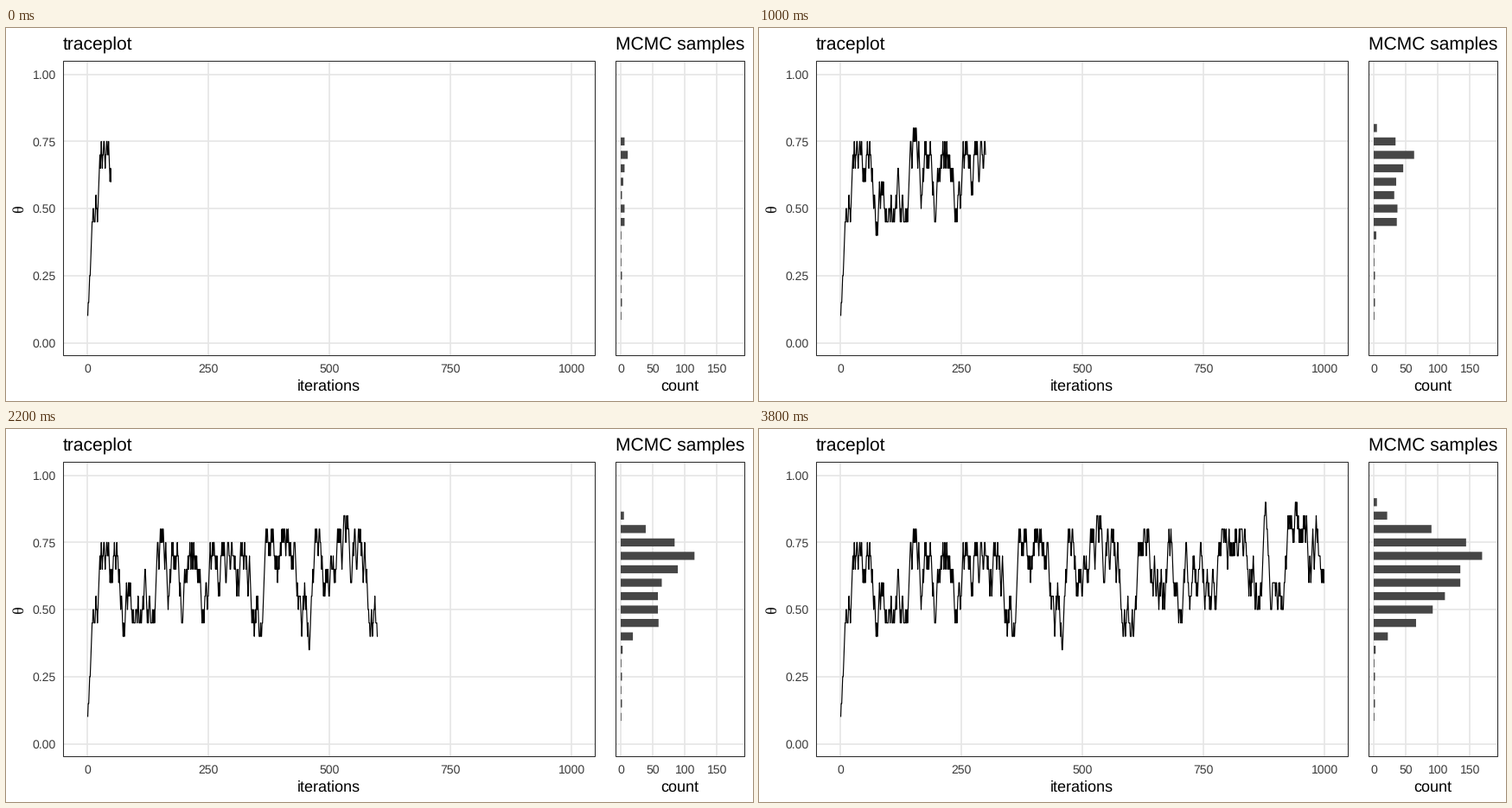
Recreate the animation shown at these times as a matplotlib script. Size 864 by 432 pixels, loop 4 s.

```python
import math
import random

import matplotlib.pyplot as plt
import numpy as np
from matplotlib.animation import FuncAnimation
from matplotlib.patches import Rectangle

plt.rcParams.update({"path.simplify": False, "text.hinting": "none",
                     "text.hinting_factor": 1})

W, H, DPI = 864, 432, 100
PX = 72 / DPI
N, CHUNK = 1000, 50
INK, GRID, BAR, TICK = "#2c2c2c", "#e6e6e6", "#464646", "#3a3a3a"
TOP, BOTTOM = 38.5, 379.5

# Main peaks and dips (iteration, level); one level is 0.05 in theta.
TURNS = [(1, 2), (13, 10), (21, 9), (34, 15), (61, 15), (77, 8), (97, 9),
         (119, 13), (139, 9), (157, 16), (167, 10), (175, 15), (195, 9),
         (220, 15), (239, 9), (281, 15), (292, 15), (309, 11), (325, 15),
         (342, 9), (357, 8), (381, 16), (418, 15), (436, 10), (459, 7),
         (479, 16), (491, 11), (531, 17), (545, 12), (561, 16), (600, 8),
         (629, 16), (666, 10), (683, 16), (706, 9), (745, 15), (766, 10),
         (783, 15), (826, 16), (862, 10), (879, 18), (890, 10), (915, 10),
         (940, 18), (963, 17), (1000, 12)]
CENTRE = 12


def iter_x(i):
    return 94 + 0.56 * i


def count_x(c):
    return 711 + 0.742 * c


def theta_y(t):
    return 364.5 - 310.8 * t


def bridge(a, b, n, rng):
    """Random steps of at most one level that lead from a to b in n moves."""
    lo, hi = min(a, b, CENTRE), max(a, b, CENTRE)
    level, path = a, []
    for left in range(n, 0, -1):
        gap = b - level
        moves = [m for m in (-1, 0, 1)
                 if abs(gap - m) < left and lo <= level + m <= hi]
        pull = 1.5 * gap / left + 0.06 * (CENTRE + 1 - level)
        weights = [math.exp(m * pull) if m else 0.5 for m in moves]
        level += rng.choices(moves, weights)[0]
        path.append(level)
    return path


def make_walk():
    rng = random.Random(4)
    walk = [TURNS[0][1]]
    for (i, a), (j, b) in zip(TURNS, TURNS[1:]):
        walk += bridge(a, b, j - i, rng)
    return np.array(walk)


walk = make_walk()
xs = iter_x(np.arange(1, N + 1))
ys = theta_y(walk / 20)

fig = plt.figure(figsize=(W / DPI, H / DPI), dpi=DPI, facecolor="white")
ax = fig.add_axes([0, 0, 1, 1])
ax.set(xlim=(0, W), ylim=(H, 0))
ax.axis("off")


def text(x, y, s, size, color="black", **kw):
    kw.setdefault("family", "Liberation Sans")
    kw.setdefault("va", "baseline")
    ax.text(x, y, s, fontsize=size * PX, color=color, **kw)


def grid_line(x, y):
    ax.plot(x, y, color=GRID, lw=1.75 * PX, solid_capstyle="butt", zorder=1)


def panel(left, right, to_x, ticks, title, label):
    for t in np.arange(5) / 4:
        grid_line([left, right], [theta_y(t)] * 2)
    for v in ticks:
        grid_line([to_x(v)] * 2, [TOP, BOTTOM])
        text(to_x(v), 399, str(v), 14.22, TICK, ha="center")
    ax.add_patch(Rectangle((left, TOP), right - left, BOTTOM - TOP, fill=False,
                           ec=INK, lw=1.05 * PX, snap=False, zorder=5))
    text(left - 0.8, 25, title, 21.33)
    text((left + right) / 2 - 0.5, 420, label, 17.78, ha="center")


panel(66.5, 681.5, iter_x, range(0, 1001, 250), "traceplot", "iterations")
panel(705.5, 854.5, count_x, range(0, 151, 50), "MCMC samples", "count")
for t in np.arange(5) / 4:
    text(57.8, theta_y(t) + 5, f"{t:.2f}", 14.22, TICK, ha="right")
text(16, 209.5, "θ", 17.78, family="Liberation Serif", rotation=90,
     ha="center", va="center")

trace, = ax.plot([], [], color="black", lw=1.18 * PX, snap=False, zorder=3,
                 solid_joinstyle="round", solid_capstyle="butt")
bars = {}
for level in range(walk.min(), walk.max() + 1):
    bars[level] = Rectangle((count_x(0), theta_y(level / 20) - 4.65), 0, 9.3,
                            fc=BAR, lw=0, snap=False, zorder=3)
    ax.add_patch(bars[level])


def draw(i):
    n = CHUNK * (i + 1)
    trace.set_data(xs[:n], ys[:n])
    for level, bar in bars.items():
        count = np.count_nonzero(walk[:n] == level)
        bar.set_width(count_x(count) - count_x(0))
    return [trace, *bars.values()]


anim = FuncAnimation(fig, draw, frames=N // CHUNK, interval=200,
                     repeat=True, repeat_delay=0)
plt.show()
```
